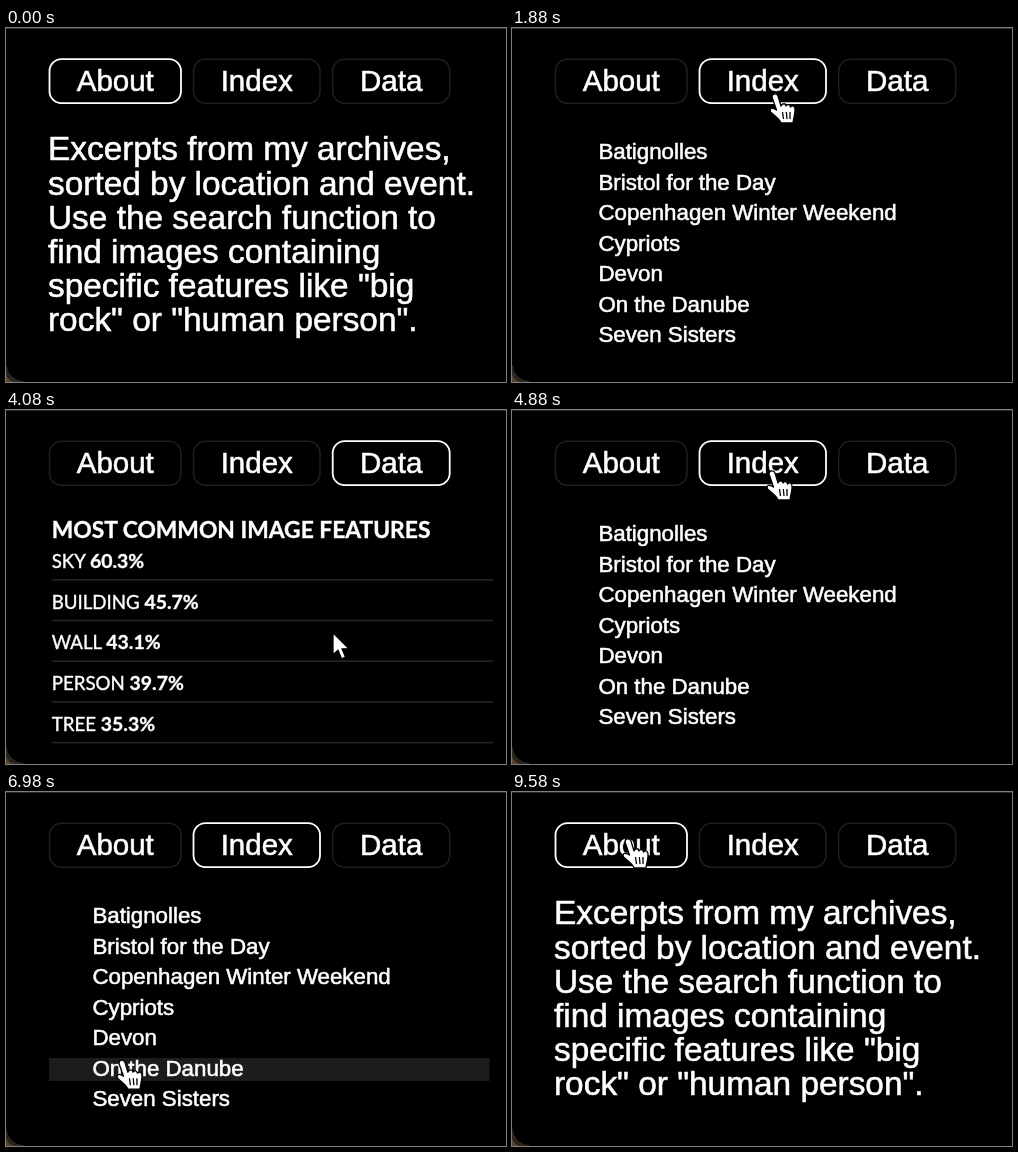
Animation of 500 by 354 pixels, one loop 9.68 s. Source, as an HTML page:

```html
<!DOCTYPE html>
<html lang="en">
<head>
<meta charset="utf-8">
<title>Archive panel</title>
<style>
html, body { margin: 0; width: 100%; height: 100%; overflow: hidden; background: #000; }
svg { display: block; width: 500px; height: 354px; }
text { fill: #fff; stroke: #fff; stroke-width: .6px; white-space: pre; font-family: "Liberation Sans", Arial, sans-serif; }
.tab { font-size: 29.5px; text-anchor: middle; }
.about { font-size: 33.4px; }
.index { font-size: 22.3px; }
.data { font: 18.7px Lato, sans-serif; stroke-width: .4px; }
.head { font: bold 22.8px Lato, sans-serif; stroke-width: .4px; }
.bold { font-weight: bold; font-size: 19.4px; }
</style>
</head>
<body>
<svg id="stage" viewBox="0 0 500 354">
  <rect width="500" height="354"/>
  <rect width="500" height="1" fill="#2c2c2c"/>
  <path d="M0 337Q2 352 18 354H0Z" fill="#2b241b"/>
  <path d="M0 346Q2 353 9 354H0Z" fill="#57452f"/>
  <path d="M0 337Q2 352 18 354" fill="none" stroke="#2c2c2c"/>
</svg>
<script>
const LOOP = 9680;
const stage = document.getElementById("stage");

function add(parent, tag, attrs = {}, content = "") {
  const el = document.createElementNS("http://www.w3.org/2000/svg", tag);
  for (const key in attrs) el.setAttribute(key, attrs[key]);
  el.textContent = content;
  parent.appendChild(el);
  return el;
}

const tabs = [["About", 43.5, 131.5], ["Index", 187.5, 126.5], ["Data", 326.7, 117]].map(([name, x, w]) => {
  const box = add(stage, "rect", { x, y: 31.2, width: w, height: 44, rx: 12 });
  add(stage, "text", { x: x + w / 2, y: 63, class: "tab" }, name);
  return { box, x, w };
});

const pages = tabs.map(() => add(stage, "g"));
const [about, index, data] = pages;

["Excerpts from my archives,", "sorted by location and event.", "Use the search function to",
 "find images containing", 'specific features like "big', 'rock" or "human person".'
].forEach((line, i) => add(about, "text", { x: 42, y: 132.3 + i * 34.2, class: "about" }, line));

const rows = ["Batignolles", "Bristol for the Day", "Copenhagen Winter Weekend", "Cypriots",
  "Devon", "On the Danube", "Seven Sisters"].map((name, i) => {
  const y = 131 + i * 30.5;
  const bar = add(index, "rect", { x: 43, y: y - 17.5, width: 440.5, height: 23, fill: "#1c1c1c" });
  add(index, "text", { x: 86.4, y, class: "index" }, name);
  return { bar, y };
});

add(data, "text", { x: 45.7, y: 128, class: "head" }, "MOST COMMON IMAGE FEATURES");
[["SKY", 60.3], ["BUILDING", 45.7], ["WALL", 43.1], ["PERSON", 39.7], ["TREE", 35.3]].forEach(([name, share], i) => {
  const y = 158 + i * 40.7;
  const label = add(data, "text", { x: 45.7, y, class: "data" }, name + " ");
  add(label, "tspan", { class: "bold" }, share + "%");
  add(data, "rect", { x: 46, y: y + 11, width: 441, height: 1.6, fill: "#242424" });
});

const pointer = add(stage, "g", { stroke: "#000", "stroke-width": 1.3, "stroke-linejoin": "round" });
const arrow = add(pointer, "path", { d: "M0 0V22L5 17.5 8.5 26 12.5 24.3 9 16H16Z", fill: "#fff" });
const hand = add(pointer, "g");
add(hand, "path", {
  d: "M-3 2C-3-2 2-2 3 1L6 11C7 8 11 8 11 11C12 9 15 9 15.5 12C17 10 20 11 20 14" +
     "C20.5 19 18.5 22 18 28H6C5 24-1 20-4.5 17C-6 13-2 12 1.5 15Z",
  fill: "#fff"
});
add(hand, "path", { d: "M7.5 17L8.5 24M11.3 17L12 24M15 17V24", fill: "none" });

// Pointer moves: start, end, x, y
const start = [140, -32];
const moves = [
  [480, 1080, 263, 67], [2280, 2880, 385, 73], [3080, 3980, 330, 230], [3980, 4780, 260, 62],
  [5280, 5880, 116, 287], [6880, 7480, 115, 47], [9480, 9580, 116, 48]
];
// Page switches: time, page
const switches = [[0, 0], [1380, 1], [3080, 2], [4880, 1], [7880, 0]];

function pointerAt(t) {
  let [x, y] = start;
  for (const [from, to, tx, ty] of moves) {
    const p = Math.min(1, Math.max(0, (t - from) / (to - from)));
    const e = p * p * (3 - 2 * p);
    x += (tx - x) * e;
    y += (ty - y) * e;
  }
  return [x, y];
}

function draw(now) {
  // Motion advances in 100 ms steps
  const t = Math.max(0, Math.floor((now % LOOP - 80) / 100) * 100 + 80);
  const [x, y] = pointerAt(t);
  const page = switches.filter(s => s[0] <= t).pop()[1];
  let link = false;

  tabs.forEach((tab, i) => {
    const over = x > tab.x && x < tab.x + tab.w && y > 31 && y < 76;
    const active = i === page;
    link ||= over;
    tab.box.setAttribute("fill", over && !active ? "#1e1e1e" : "#000");
    tab.box.setAttribute("stroke", active ? "#fff" : "#1f1f1f");
    tab.box.setAttribute("stroke-width", active ? 1.8 : 1.5);
    pages[i].style.display = active ? "" : "none";
  });
  rows.forEach(row => {
    const over = page === 1 && x > 43 && x < 483 && y >= row.y - 18 && y <= row.y + 5;
    link ||= over;
    row.bar.style.display = over ? "" : "none";
  });

  pointer.setAttribute("transform", `translate(${x} ${y})`);
  hand.style.display = link ? "" : "none";
  arrow.style.display = link ? "none" : "";
}

const began = performance.now();
function tick() {
  draw(performance.now() - began);
  requestAnimationFrame(tick);
}
tick();
</script>
</body>
</html>
```
